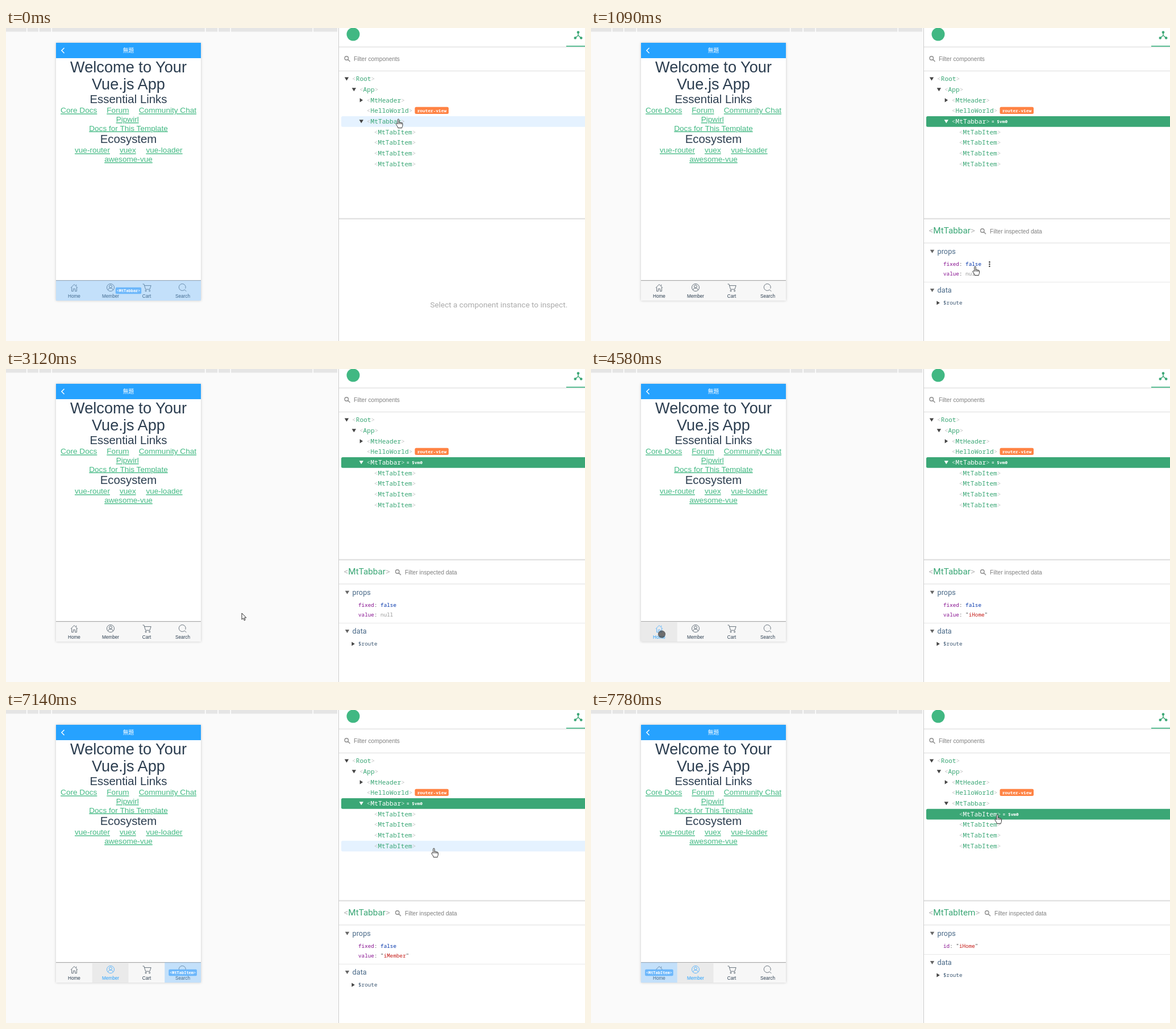
Recreate the animation shown at these times as an HTML page. Size 1019 by 550 pixels, loop 8.25 s.

```html
<!DOCTYPE html>
<html lang="en">
<head>
<meta charset="utf-8">
<title>Component inspector</title>
<style>
  html, body { margin: 0; width: 100%; height: 100%; overflow: hidden; background: #fff; }
  svg { display: block; width: 100vw; height: 100vh; }
  text { white-space: pre; }
  .sans { font-family: "Liberation Sans", Arial, sans-serif; }
  .h1 { font-size: 27.2px; }
  .h2 { font-size: 20.4px; }
  .link { font-size: 13.6px; text-decoration: underline; }
  .label { font-size: 8.2px; }
  .filter { font-size: 10.2px; }
  .cjk { font: 500 9.7px "Noto Sans CJK JP", "Noto Sans CJK", sans-serif; }
  .ui { font-family: Roboto, sans-serif; }
  .hint { font-size: 13.6px; }
  .title { font-size: 15.3px; }
  .section { font-size: 12.75px; }
  .mono { font-family: "Noto Sans Mono", monospace; }
  .tree { font-size: 11.2px; }
  .field { font-size: 9.3px; }
  .tip { font-size: 9.3px; font-weight: 700; }
  .badge { font-size: 7.8px; font-weight: 700; }
  .mini { font-size: 7px; font-weight: 700; }
  .mid { text-anchor: middle; }
  .icon { fill: none; stroke-width: .85; }
</style>
</head>
<body>
<svg id="stage" viewBox="0 0 1019 550" xmlns="http://www.w3.org/2000/svg"></svg>
<script>
const LOOP = 8250, TICK = 77.8;
const GREEN = '#3ba776', SLATE = '#2c3e50', BLUE = '#26a2ff', STEEL = '#486887';

const rect = (x, y, w, h, fill, extra = '') =>
  `<rect x="${x}" y="${y}" width="${w}" height="${h}" fill="${fill}" ${extra}/>`;
const text = (x, y, content, cls, fill) =>
  `<text x="${x}" y="${y}" class="${cls}" fill="${fill}">${content}</text>`;
const span = (content, fill) => `<tspan fill="${fill}">${content}</tspan>`;
const tag = (name, bracket) => span('&lt;', bracket) + name + span('&gt;', bracket);
const path = (d, attrs) => `<path d="${d}" ${attrs}/>`;
const caret = (x, y, open, fill = '#444') => path(
  open ? `M${x - 3.7} ${y - 3}h7.4l-3.7 6z` : `M${x - 2.6} ${y - 3.6}v7.2l5.4 -3.6z`, `fill="${fill}"`);
const magnifier = (x, y) =>
  path(`M${x + 1.4} ${y + 1.4}l3.6 3.6M${x + 2} ${y - 1}a3.2 3.2 0 1 1 -6.4 0a3.2 3.2 0 1 1 6.4 0`,
    'fill="none" stroke="#8c8c8c" stroke-width="1.4"');

const tabs = [
  { name: 'Home', x: 120, icon: 'M114 456.5l6-6 6 6M115.6 455.5v7h2.8v-4.2h3.2v4.2h2.8v-7M123.8 453v-2.2' },
  { name: 'Member', x: 184, icon: 'M190.5 456a6.5 6.5 0 1 1 -13 0a6.5 6.5 0 1 1 13 0M186.5 454.2a2.5 2.5 0 1 1 -5 0a2.5 2.5 0 1 1 5 0M179.6 460.6c.6-4.8 8.2-4.8 8.8 0' },
  { name: 'Cart', x: 247.5, icon: 'M240.5 450h2.3l2.8 9.2h7.4l2.2-6.6h-11.5M247.2 461.8a1.1 1.1 0 1 1 -2.2 0a1.1 1.1 0 1 1 2.2 0M253.8 461.8a1.1 1.1 0 1 1 -2.2 0a1.1 1.1 0 1 1 2.2 0' },
  { name: 'Search', x: 311, icon: 'M314.3 459.8a5.9 5.9 0 1 1 1.4-2M314.3 459.8l3 3' }
];

// name, indent level, caret: 1 open, 0 closed, none for leaves
const rows = [['Root', 0, 1], ['App', 1, 1], ['MtHeader', 2, 0], ['HelloWorld', 2], ['MtTabbar', 2, 1],
  ...Array(4).fill(['MtTabItem', 3])];
const rowTop = i => 80.3 + 18.68 * i;

// Pointer hot spot: tick, x, y
const pointerPath = [
  [0, 690.5, 160], [5, 690.5, 160], [6, 690, 163], [8, 686, 200], [10, 684, 270], [12, 680, 370],
  [14, 676, 419], [16, 677, 415], [17, 677, 417], [19, 677, 427], [23, 678, 430], [24, 678, 430],
  [25, 672, 431], [28, 655, 432], [30, 643, 431], [33, 620, 433], [35, 600, 436], [36, 570, 434],
  [37, 530, 433], [39, 530, 433], [40, 415, 429], [43, 260, 455], [45, 130, 474], [46, 63, 477],
  [47, 68, 474], [49, 105, 468], [50, 118, 465], [51, 120, 465], [58, 120, 465], [59, 124.5, 466],
  [66, 186, 468.5], [67, 186, 468.5], [68, 189.5, 469], [88, 189.5, 469], [89, 230, 453],
  [90, 400, 385], [91, 620, 290], [92, 753, 243], [93, 745, 225], [94, 730, 205], [95, 720, 188],
  [96, 715, 184], [107, 715, 184]
];

function pointerAt(tick) {
  const next = pointerPath.findIndex(p => p[0] > tick);
  const [t0, x0, y0] = pointerPath[next - 1], [t1, x1, y1] = pointerPath[next];
  const k = (tick - t0) / (t1 - t0);
  return { x: x0 + (x1 - x0) * k, y: y0 + (y1 - y0) * k };
}

function phonePage() {
  const line = (y, content, cls, x = 215.5) => text(x, y, content, `sans mid ${cls}`, SLATE);
  const link = (x, y, content) => text(x, y, content, 'sans link', '#42b983');
  const midLink = (x, y, content) => text(x, y, content, 'sans link mid', '#42b983');
  return rect(0, 0, 585, 550, '#fafafa') + rect(0, 0, 583, 6.5, '#e5e5e5') +
    [36, 57, 79.5, 350, 372.5, 394.5, 539.5].map(x => rect(x, 0, 1.5, 7, '#fff')).join('') +
    rect(88, 26, 255, 453, '#fff', 'style="filter:drop-shadow(0 0 2px #0003)"') +
    rect(88, 26, 255, 27, BLUE) +
    path('M102.5 35l-4.6 4.6 4.6 4.6', 'fill="none" stroke="#fff" stroke-width="1.4"') +
    text(215.5, 43.4, '無題', 'cjk mid', '#fff') +
    line(77.5, 'Welcome to Your', 'h1') + line(108.2, 'Vue.js App', 'h1') +
    line(132.3, 'Essential Links', 'h2') +
    link(96.1, 149.3, 'Core Docs') + link(177.3, 149.3, 'Forum') + link(233.8, 149.3, 'Community Chat') +
    midLink(213.7, 165, 'Pipwirl') + midLink(215.5, 180.6, 'Docs for This Template') +
    line(202.3, 'Ecosystem', 'h2') +
    link(121, 219.3, 'vue-router') + link(200, 219.3, 'vuex') + link(246.4, 219.3, 'vue-loader') +
    midLink(215.5, 235, 'awesome-vue');
}

function inspectorFrame() {
  return rect(585, 0, 434, 550, '#fff') + rect(585, 0, 1, 550, '#ccc') +
    '<circle cx="611" cy="11" r="11.5" fill="#41b883"/>' +
    rect(586, 32.5, 433, 1, '#ddd') + rect(586, 33.5, 433, 1.5, '#f3f3f3') + rect(986, 31, 33, 2, '#5cbd94') +
    path('M1007 8v5l-5 4.5M1007 13l5 4.5', `fill="none" stroke="${GREEN}" stroke-width="1.5"`) +
    [[1007, 7.5], [1001.8, 17.5], [1012.2, 17.5]].map(([x, y]) => `<circle cx="${x}" cy="${y}" r="2.3" fill="${GREEN}"/>`).join('') +
    magnifier(600.5, 54) + text(612, 57.8, 'Filter components', 'sans filter', '#808080') +
    rect(586, 75, 433, 1, '#ddd') +
    rect(586, 333.5, 433, 1.5, '#f0f0f0') + rect(586, 335, 433, 1, '#d0d0d0');
}

function tabbar(active, hovered) {
  let out = rect(88, 443, 255, 36, '#f7f7f7') + rect(88, 443, 255, 1.2, '#aaa');
  tabs.forEach((tab, i) => {
    const on = i === active;
    if (on) out += rect(88 + 63.75 * i, 444.2, 63.75, 34.8, '#eaeaea');
    out += path(tab.icon, `class="icon" stroke="${on ? '#4aaeff' : '#4d5a66'}"`) +
      text(tab.x, 474, tab.name, 'sans label mid', on ? BLUE : SLATE);
  });
  if (hovered >= 4) {
    const whole = hovered === 4, name = rows[hovered][0];
    const x = whole ? 88 : 88 + 63.75 * (hovered - 5), w = whole ? 255 : 63.75;
    const badge = (name.length + 2) * 4.2 + 3.4;
    out += rect(x, 443.5, w, 35.5, '#68b6ff', 'opacity=".36"') +
      rect(x + (w - badge) / 2, 455.8, badge, 11.4, '#6cb7fb', 'rx="2"') +
      text(x + w / 2, 464, tag(name, '#e4f2ff'), 'mono mini mid', '#fff');
  }
  return out;
}

function tree(selected, hovered) {
  return rows.map(([name, level, open], i) => {
    const top = rowTop(i), mid = top + 9.2, x = 609 + 12.9 * level, chosen = i === selected;
    const end = x + (name.length + 2) * 6.72;
    let out = '';
    if (chosen) out += rect(590, top, 432, 18.68, GREEN, 'rx="2.5"');
    else if (i === hovered) out += rect(590, top, 432, 18.68, '#e5f2ff', 'rx="2.5"');
    if (open !== undefined) out += caret(x - 9.5, mid, open, chosen ? '#fff' : '#444');
    out += text(x, mid + 3.9, tag(name, chosen ? '#c4e4d6' : '#c4c4c4'), 'mono tree', chosen ? '#fff' : GREEN);
    if (chosen) out += text(end + 3, mid + 3, '= $vm0', 'mono badge', '#fff');
    if (name === 'HelloWorld')
      out += rect(719.5, 138.8, 59.5, 12.2, '#ff8344', 'rx="2.5"') + text(723.7, 147.7, 'router-view', 'mono badge', '#fff');
    return out;
  }).join('');
}

function field(y, key, value, hovered) {
  const x = 620 + (key.length + 2 + value.length) * 5.58 + 14.4;
  const shown = value[0] === '"' ? '"' + span(value.slice(1, -1), '#c41a16') + '"'
    : span(value, value === 'null' ? '#999' : '#0033aa');
  let out = text(620, y + 3.4, span(key, '#881391') + ': ' + shown, 'mono field', '#444');
  if (hovered) for (const dy of [-3.7, 0, 3.7]) out += `<circle cx="${x}" cy="${y + dy}" r="1.25" fill="#333"/>`;
  return out;
}

function tooltip() {
  return rect(727, 411.7, 152, 40.5, SLATE, 'rx="2.5"') + path('M727.5 428l-4.5 4.3 4.5 4.3z', `fill="${SLATE}"`) +
    [['type', 'any', 428], ['required', 'false', 443.4]].map(([key, value, y]) =>
      text(739.5, y, key, 'mono tip', '#c07fd0') + text(807.5, y, value, 'mono tip', '#fff')).join('');
}

function details(selected, value, fieldHover) {
  if (selected < 0) return text(867.3, 491, 'Select a component instance to inspect.', 'ui hint mid', '#aaa');
  const name = rows[selected][0], isTab = selected > 4;
  const shift = isTab ? -17 : 0, filterX = isTab ? 710 : 702;
  const section = (y, label) => caret(600.5, y, 1, '#666') + text(609.5, y + 4.2, label, 'ui section', STEEL);
  return text(594.5, 361.4, tag(name, '#bbb'), 'ui title', GREEN) +
    magnifier(filterX - 12, 357) + text(filterX, 360.6, 'Filter inspected data', 'sans filter', '#808080') +
    rect(586, 377.3, 433, 1, '#ddd') + section(392.8, 'props') +
    (isTab ? field(415, 'id', '"iHome"')
      : field(415, 'fixed', 'false', fieldHover === 0) + field(432, 'value', value, fieldHover === 1)) +
    rect(586, 446 + shift, 433, 1, '#e8e8e8') + section(461 + shift, 'data') +
    caret(611, 483 + shift, 0) + text(620, 486.3 + shift, '$route', 'mono field', '#3d5873') +
    (fieldHover === 1 ? tooltip() : '');
}

function cursor({ x, y }, overItem) {
  if (x > 88 && x < 343 && y > 26 && y < 479)
    return `<circle cx="${x}" cy="${y}" r="6.2" fill="#444" fill-opacity=".75" stroke="#333" stroke-opacity=".6" stroke-width=".8"/>`;
  const shape = overItem
    ? 'M-1.2 8.6V1.2C-1.2-.4 1.2-.4 1.2 1.2V6C1.6 4.9 3.4 5.1 3.5 6.4C4.2 5.5 5.6 5.8 5.6 7C6.4 6.4 7.5 6.9 7.5 8V11.2C7.5 13 6.4 13.6 6.3 15.7H-.6C-.7 13.4-2.4 12.4-3.9 9.5C-4.5 8-2.8 7-1.2 8.6M1.2 6V9M3.5 6.4V9M5.6 7V9.2'
    : 'M0 0V11.2L2.6 8.8L4.3 12.8L6.1 12L4.4 8.1H7.8Z';
  return path(shape, `transform="translate(${x} ${y})" fill="#fff" stroke="#222" stroke-width=".95" stroke-linejoin="round"`);
}

const backdrop = phonePage() + inspectorFrame();

function scene(t) {
  const pointer = pointerAt(Math.floor((t + 18) / TICK)), { x, y } = pointer;
  const selected = t < 170 ? -1 : t < 7780 ? 4 : 5;
  const active = t < 4200 ? -1 : t < 6140 ? 0 : 1;
  const value = ['null', '"iHome"', '"iMember"'][active + 1];
  const row = Math.floor((y - rowTop(0)) / 18.68);
  const hovered = x > 590 && row >= 0 && row < rows.length ? row : -1;
  const fieldHover = x > 612 && y > 406 && y < 441 ? +(y > 423.5) : -1;
  return backdrop + tabbar(active, hovered) + tree(selected, hovered) +
    details(selected, value, fieldHover) + cursor(pointer, hovered >= 0 || fieldHover >= 0);
}

const stage = document.getElementById('stage');
const start = performance.now();
let shown = '';
function draw() {
  const markup = scene((performance.now() - start) % LOOP);
  if (markup !== shown) stage.innerHTML = shown = markup;
  requestAnimationFrame(draw);
}
draw();
</script>
</body>
</html>
```
